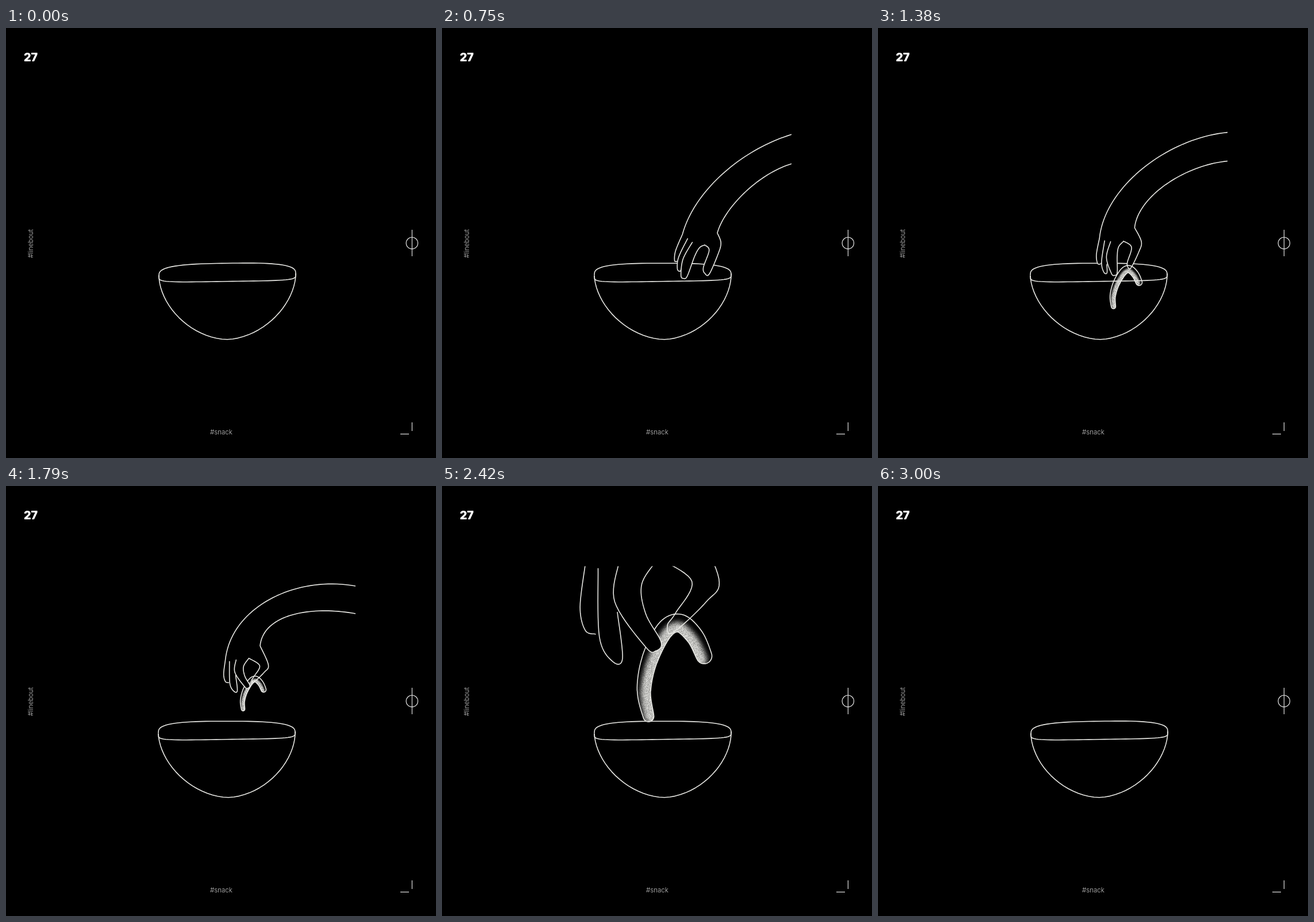
Write an HTML page with a canvas that moves like this. It is 748 px wide and 748 px high and loops after 3.08 s.

```html
<!DOCTYPE html>
<html lang="en">
<head>
<meta charset="utf-8">
<title>27 #snack</title>
<style>
  html, body { margin: 0; width: 100%; height: 100%; overflow: hidden; background: #000; }
  svg, canvas { position: absolute; left: 0; top: 0; width: 748px; height: 748px; }
  text { font-family: Inter, "Liberation Sans", sans-serif; }
  .day { font-size: 19.5px; font-weight: 900; fill: #fff; }
  .tag { font-size: 11.5px; font-weight: 300; fill: #c4c4c4; }
  .mark { fill: none; stroke: #dcdcdc; stroke-width: 1.2; }
</style>
</head>
<body>
<svg viewBox="0 0 748 748">
  <text class="day" x="31" y="57.5">27</text>
  <text class="tag" x="355" y="706.5">#snack</text>
  <text class="tag" transform="translate(46.5 400) rotate(-90)">#linebout</text>
  <path class="mark" d="M706.4 351V397M706.4 686V701M686 706.4H701"/>
  <circle class="mark" cx="706.3" cy="374.2" r="10.2"/>
</svg>
<canvas id="stage" width="748" height="748"></canvas>
<script>
const ctx = document.getElementById('stage').getContext('2d');
const LOOP = 3080, FRAME = 1000 / 24, INK = '#e8e8e4';

const lerp = (a, b, u) => a + (b - a) * u;
const range = (n, fn) => Array.from({ length: n + 1 }, (_, i) => fn(i / n));

function cubic(a, b, c, d, n = 20) {
  return range(n, t => [0, 1].map(k => {
    const s = 1 - t;
    return s * s * s * a[k] + 3 * s * s * t * b[k] + 3 * s * t * t * c[k] + t * t * t * d[k];
  }));
}

// Smooth curve through a few key points
function spline(p) {
  const at = i => p[Math.max(0, Math.min(p.length - 1, i))];
  return p.slice(1).flatMap((end, i) => {
    const start = p[i];
    const c1 = start.map((v, k) => v + (end[k] - at(i - 1)[k]) / 6);
    const c2 = end.map((v, k) => v - (at(i + 2)[k] - start[k]) / 6);
    return cubic(start, c1, c2, end, 10);
  });
}

function path(p) {
  ctx.beginPath();
  p.forEach(q => ctx.lineTo(...q));
}

function line(p, width = 1.6) {
  path(p);
  ctx.strokeStyle = INK;
  ctx.lineWidth = width;
  ctx.stroke();
}

function fill(p) {
  path(p);
  ctx.fillStyle = '#000';
  ctx.fill();
}

// One half of a superellipse, from left to right
function arc(cx, height, power, tilt, skew = 0) {
  return range(40, t => {
    const x = -Math.cos(t * Math.PI);
    const y = Math.max(0, 1 - Math.abs(x) ** power) ** (1 / power);
    return [cx + 119 * x + skew * y, 429.5 + height * y + tilt * 119 * x];
  });
}
const makeBowl = (cx, skew, tilt) => ({
  back: arc(cx, -20.3, 3, tilt),
  front: arc(cx, 11.3, 5, -.015),
  body: arc(cx, 112.3, 1.8, -.012, skew)
});
const bowls = [makeBowl(385, 0, -.015), makeBowl(384, 3, 0)];

// Finger key points, measured from the base of the thumb
function shape(ox, oy, strokes) {
  return strokes.map(s => s.split(' ').map(p => {
    const [x, y] = p.split(',');
    return [x - ox, y - oy];
  }));
}
const open = shape(449, 388, [
  '390,400 383,430 384,447 388,448',
  '400,406 390,440 391,460 396,464 398,459',
  '409,411 398,442 399,470 404,475 410,470 417,434 423,418 431,412',
  '431,412 440,420 435,451 440,461 447,460 456,425 458,404 449,388'
]);
const pinched = shape(439, 240, [
  '355,275 351,308 355,326 363,329',
  '365,278 366,331 376,350 384,348 380,312',
  '381,274 378,304 402,339 410,342 414,335 402,313 399,290 412,270',
  '412,270 438,288 425,313 419,322 423,328 449,304 459,286 439,240'
]);
const [spine] = shape(439, 240, ['398,393 396.5,373 403,349 416.7,326 428.6,320.5 440.4,331 447.5,346']);

const linear = u => u;
const easeIn = u => u * u;
const easeOut = u => Math.sin(u * Math.PI / 2);
const smooth = u => u * u * (3 - 2 * u);

// Placement of the hand; top and low are where the arm meets the edge
const reach = { x: 568, y: 263, turn: .656, size: 1.03, pinch: 0, top: 183, low: 234, lean: .44, edge: 608, sway: 0 };
const dip = { ...reach, x: 449, y: 388, turn: 0, size: 1, top: 186, low: 237, lean: .26 };
const lift = { ...dip, x: 442, y: 278, size: .72, pinch: 1, top: 174, low: 222, lean: -.18 };
const near = { ...lift, x: 439, y: 240, size: 1, top: 20, low: 153, lean: 0, sway: 15 };
const close = { ...near, x: 435.5, y: -71, size: 3.12, top: -600, low: -340, sway: 0 };
const enter = { ...reach, x: 708, y: 233, top: 153, low: 204, edge: 748 };
const leave = { ...close, y: -401 };

// start, end, from, to, easing; counted in 1/24 s
const moves = [
  [3, 11, enter, reach, linear],
  [11, 24, reach, dip, easeOut],
  [24, 26, dip, dip, linear],
  [26, 43, dip, lift, smooth],
  [43, 53, lift, near, easeIn],
  [53, 62, near, close, smooth],
  [62, 66, close, leave, easeIn]
];

function poseAt(f) {
  const move = moves.find(([start, end]) => f >= start && f < end);
  if (!move) return null;
  const [start, end, from, to, ease] = move;
  const u = ease((f - start) / (end - start));
  return Object.fromEntries(Object.keys(from).map(k => [k, lerp(from[k], to[k], u)]));
}

function makeGrain() {
  const tile = document.createElement('canvas');
  tile.width = tile.height = 160;
  const g = tile.getContext('2d');
  let seed = 27;
  const random = () => (seed = seed * 16807 % 2147483647) / 2147483647;
  for (let i = 0; i < 160 * 160; i++) {
    g.fillStyle = `rgba(0,0,0,${random() * .32})`;
    g.fillRect(i % 160, Math.floor(i / 160), 1, 1);
  }
  return ctx.createPattern(tile, 'repeat');
}
const grain = makeGrain();

function drawSnack(place, size, sway) {
  const bent = spine.map(([x, y], i) => [x + sway * Math.max(0, 1 - i / 3), y]);
  const mid = spline(bent.map(place));
  const last = mid.length - 1;
  const ring = i => {
    const a = mid[Math.max(0, i - 1)], b = mid[Math.min(last, i + 1)];
    return {
      angle: Math.atan2(b[1] - a[1], b[0] - a[0]),
      r: size * (4.2 + 2.8 * Math.sin(2.4 * i / last))
    };
  };
  const rim = (i, turn) => {
    const { angle, r } = ring(i);
    return [mid[i][0] + r * Math.cos(angle + turn), mid[i][1] + r * Math.sin(angle + turn)];
  };
  const quarter = Math.PI / 2;
  const outer = mid.map((_, i) => rim(i, -quarter));
  const inner = mid.map((_, i) => rim(i, quarter));
  const tip = range(12, t => rim(last, lerp(-quarter, quarter, t)));
  const tail = range(12, t => rim(0, lerp(quarter, 3 * quarter, t)));
  const outline = [...outer, ...tip, ...inner.slice().reverse(), ...tail];

  fill(outline);
  ctx.save();
  ctx.clip();
  // Light gathers along the inner edge
  ctx.filter = `blur(${size * 1.8}px)`;
  line(inner, size * 15.5);
  ctx.filter = 'none';
  ctx.fillStyle = grain;
  ctx.fillRect(0, 0, 748, 748);
  ctx.restore();
  line([...outline, outline[0]]);
}

function drawHand(h) {
  const cos = Math.cos(h.turn), sin = Math.sin(h.turn);
  const place = ([x, y]) => [
    h.x + h.size * (x * cos - y * sin),
    h.y + h.size * (x * sin + y * cos)
  ];
  const [little, ring, index, thumb] = open.map((stroke, s) => spline(stroke.map((p, i) =>
    place(p.map((v, k) => lerp(v, pinched[s][i][k], h.pinch))))));
  const arm = (from, y, stiff) => {
    const span = h.edge - from[0];
    const up = [.1 * cos + sin, .1 * sin - cos];
    return cubic(from,
      from.map((v, k) => v + up[k] * span * stiff),
      [h.edge - .47 * span, y + .47 * span * h.lean],
      [h.edge, y], 40);
  };

  ctx.save();
  ctx.beginPath();
  ctx.rect(0, 139.5, 608, 608);
  ctx.clip();
  fill([...little, ...ring, ...index, ...thumb]);
  line([...arm(little[0], h.top, .4).reverse(), ...little]);
  line(ring);
  if (h.pinch > .15) drawSnack(place, h.size, h.sway);
  fill(index);
  line(index);
  line([...thumb, ...arm(thumb[thumb.length - 1], h.low, .33)]);
  ctx.restore();
}

function draw(now) {
  const f = Math.floor((now % LOOP + 5) / FRAME);
  const bowl = bowls[f % 5 < 3 || f > 71 ? 0 : 1];
  const hand = poseAt(f);
  ctx.clearRect(0, 0, 748, 748);
  ctx.lineCap = ctx.lineJoin = 'round';
  line(bowl.back);
  if (hand) drawHand(hand);
  line(bowl.front);
  line(bowl.body);
}

const begin = performance.now();
function tick() {
  draw(performance.now() - begin);
  requestAnimationFrame(tick);
}
tick();
</script>
</body>
</html>
```
